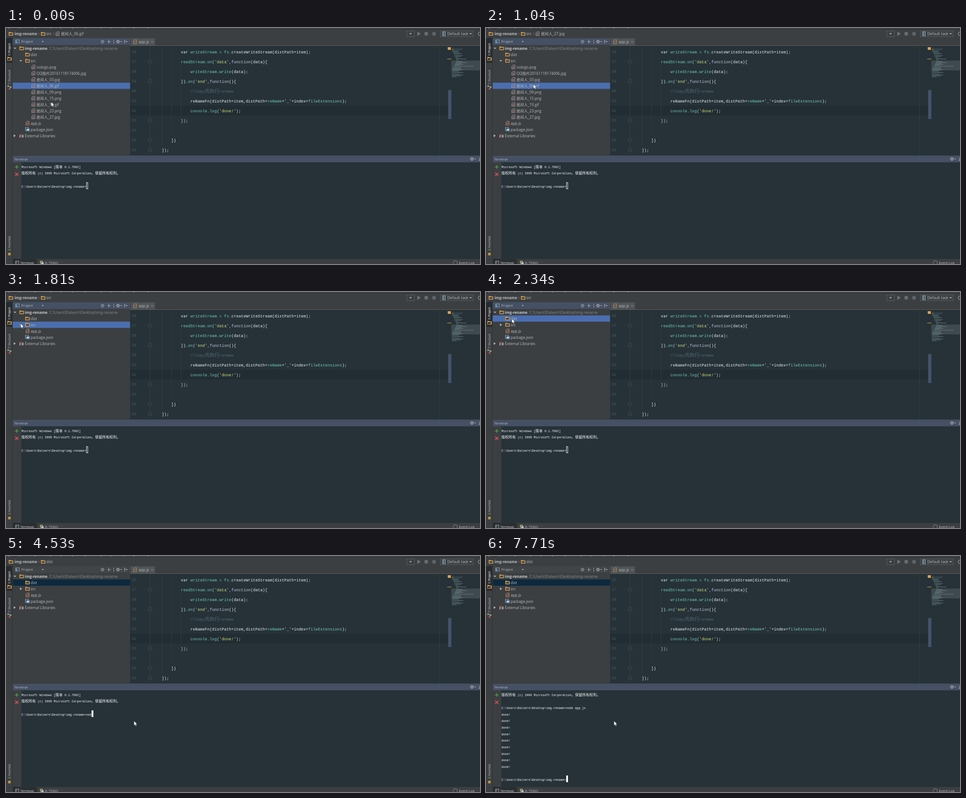
These frames come from a looping animation (1058x529 px, 8000 ms). An HTML page with a canvas:

```html
<!DOCTYPE html>
<html lang="zh">
<head>
<meta charset="utf-8">
<title>img-rename</title>
<style>
html, body { margin: 0; width: 100%; height: 100%; overflow: hidden; background: #3c3f41; }
canvas { display: block; }
</style>
</head>
<body>
<canvas id="stage" width="1058" height="529"></canvas>
<script>
const c = document.getElementById('stage').getContext('2d');
const LOOP = 8000;
const UI = '"Open Sans", "Noto Sans CJK SC", "Noto Sans CJK", sans-serif';
const MONO = '"Liberation Mono", monospace';
const CJK = '"Noto Sans CJK SC", "Noto Sans CJK", sans-serif';
const PANEL = '#3c3f41', DARK = '#263238', BLUE = '#455064', TAN = '#cfa05c', GREY = '#a9adb0', TEXT = '#bcbec0';
const PROMPT = 'C:\\Users\\Dalvern\\Desktop\\img-rename>';

// Timelines: [start in ms, value...]
const pointer = [[0, 101, 166], [270, 100, 172], [520, 98, 202], [770, 109, 139], [1040, 106, 126],
  [1290, 88, 112], [1560, 33, 71], [2090, 36, 69], [2340, 58, 60], [2860, 140, 298],
  [3140, 195, 370], [3420, 196, 354], [3690, 286, 370]];
const selection = [[0, '居间人_06.gif'], [270, '居间人_19.gif'], [520, '居间人_27.jpg'], [1040, '居间人_06.gif'],
  [1290, '居间人_03.jpg'], [1810, 'src'], [2340, 'dist']];
const crumbs = [[0, '居间人_06.gif'], [520, '居间人_19.gif'], [1040, '居间人_27.jpg'], [1290, '居间人_06.gif'],
  [1560, '居间人_03.jpg'], [1810, 'src'], [2590, 'dist']];
const typing = [[0, ''], [4530, 'nod'], [4810, 'node '], [5060, 'node ap'], [5330, 'node app'], [5830, 'node app.'],
  [6110, 'node app.s'], [6380, 'node app.sj'], [6630, 'node app.s'], [6880, 'node app.'], [7160, 'node app.js']];
const COLLAPSE = 1810, FOCUS = 3690, BLINK = 3970, RUN = 7710;
const files = ['nologo.png', 'QQ图片20161118174006.jpg', '居间人_03.jpg', '居间人_06.gif', '居间人_09.png',
  '居间人_15.png', '居间人_19.gif', '居间人_23.png', '居间人_27.jpg'];

// Each code line: indent level, then runs led by a colour key
const hues = { w: '#e8eeee', t: '#6fcbb8', p: '#b9d3d0', k: '#c6c3dc', s: '#d3dc78', c: '#526a74' };
const code = [
  [2, 'wvar |twriteStream = fs.|wcreateWriteStream(distPath+item)|p;'],
  [2, "treadStream.on|p('|sdata|p',|kfunction|w(data){"],
  [3, 'twriteStream.write|w(data)|p;'],
  [2, "w}).|ton|p('|send|p',|kfunction|w(){"],
  [3, 'c//copy完执行rename'],
  [3, "wreNameFn(distPath+item,distPath+|treName|w+|s'_'|w+index+|tfileExtensions|w);"],
  [3, "tconsole.log|p('|sdone!|p')|w;"],
  [2, 'p});'], [0, ''], [1, 'w})'], [0, 'w});']
];

const at = (list, t) => list.findLast(e => e[0] <= t);

function box(x, y, w, h, color) {
  c.fillStyle = color;
  c.fillRect(x, y, w, h);
}
function frame(x, y, w, h, color) {
  c.strokeStyle = color;
  c.lineWidth = 1;
  c.strokeRect(x + .5, y + .5, w - 1, h - 1);
}
function poly(points, color) {
  c.fillStyle = color;
  c.beginPath();
  for (let i = 0; i < points.length; i += 2) c.lineTo(points[i], points[i + 1]);
  c.fill();
}
function line(points, color, width = 1) {
  c.strokeStyle = color;
  c.lineWidth = width;
  c.beginPath();
  for (let i = 0; i < points.length; i += 2) c.lineTo(points[i], points[i + 1]);
  c.stroke();
}
function ring(x, y, r, color, width = 1) {
  c.strokeStyle = color;
  c.lineWidth = width;
  c.beginPath();
  c.arc(x, y, r, 0, 7);
  c.stroke();
}
function label(text, x, y, size = 8.4, color = TEXT, weight = 400) {
  c.font = `${weight} ${size}px ${UI}`;
  c.fillStyle = color;
  c.fillText(text, x, y + size * .36);
}
// Monospaced text; CJK glyphs take two cells
function mono(text, x, y, cell, color) {
  c.fillStyle = color;
  for (const run of text.match(/[\u3000-\u9fff]+|[^\u3000-\u9fff]+/g) || []) {
    const wide = run[0] >= '\u3000';
    c.font = wide ? `${cell * 2}px ${CJK}` : `${cell / .6}px ${MONO}`;
    c.fillText(run, x, y + cell * .56);
    x += run.length * cell * (wide ? 2 : 1);
  }
  return x;
}

const down = (x, y, color = GREY, r = 3) => poly([x - r, y - r / 2, x + r, y - r / 2, x, y + r / 2 + .5], color);
const right = (x, y, color = GREY) => poly([x - 2, y - 3, x + 3, y, x - 2, y + 3], color);
const chevron = x => line([x - 1, 10, x + 1.5, 13, x - 1, 16], '#6d7173');

function folder(x, y) {
  poly([x, y - 4, x + 4, y - 4, x + 5, y - 3, x + 10, y - 3, x + 10, y + 4, x, y + 4], TAN);
  box(x + 1.5, y - 1.5, 7, 4, '#4a4238');
}
function fileIcon(x, y) {
  line([x + .5, y + 4, x + .5, y - 2, x + 3, y - 4.5, x + 7.5, y - 4.5, x + 7.5, y + 4, x, y + 4], '#9aa0a4');
  box(x + 2, y - 1.5, 4, 1, '#9aa0a4');
  box(x + 2, y + .5, 4, 2, '#b5654f');
}
function scriptIcon(x, y) {
  line([x + .5, y + 4, x + .5, y - 2, x + 3, y - 4.5, x + 7.5, y - 4.5, x + 7.5, y + 4, x, y + 4], '#b3927e');
  box(x + 2, y - 2, 5, 5, '#4b3b35');
  line([x + 3, y - 2, x + 3, y + 2], '#e08c5a');
  line([x + 5.5, y - 2, x + 5.5, y + 2], '#e08c5a');
}
function jsonIcon(x, y) {
  frame(x, y - 5, 8, 8, '#9aa7b0');
  box(x + 2, y - 2, 8, 6, '#5f90b5');
  box(x + 4, y - 1, 4, 3, '#d5dde2');
}
function libraryIcon(x, y) {
  box(x, y - 2, 2, 6, '#9aa7b0');
  box(x + 3, y - 4, 2, 8, '#c75450');
  box(x + 6, y - 2, 3, 6, '#9aa7b0');
}
function gear(x, y) {
  ring(x, y, 2.4, GREY, 1.5);
  for (let i = 0; i < 8; i++) {
    const a = i * Math.PI / 4;
    line([x + 3 * Math.cos(a), y + 3 * Math.sin(a), x + 4.2 * Math.cos(a), y + 4.2 * Math.sin(a)], GREY);
  }
  down(x + 7, y, GREY, 2);
}

function topBar(crumb) {
  box(0, 0, 1058, 22, PANEL);
  for (const x of [5, 29, 64, 98, 121, 147, 176, 210, 232, 263, 284, 316]) box(x, 0, 3, 1, '#8e9294');
  box(0, 3, 1058, 1, '#323537');
  folder(6, 13);
  label('img-rename', 19, 13, 8.4, TEXT, 700);
  chevron(73);
  folder(78, 13);
  label(crumb === 'dist' ? 'dist' : 'src', 90, 13);
  if (crumb.includes('.')) {
    chevron(106);
    fileIcon(111, 13);
    label(crumb, 123, 13);
  }
  frame(894, 6, 18, 14, '#5b5f61');
  down(903, 13);
  poly([918, 8, 926, 13, 918, 18], '#6b6f71');
  poly([935, 10, 938, 8, 941, 10, 942, 14, 938, 18, 934, 14], '#6b6f71');
  line([933, 10, 943, 16], '#6b6f71');
  line([943, 10, 933, 16], '#6b6f71');
  ring(955, 13, 3.5, '#6b6f71', 1.5);
  poly([954, 10, 960, 13, 954, 16], '#6b6f71');
  frame(969, 6, 74, 14, '#5b5f61');
  frame(974, 8, 7, 10, '#aebcc5');
  box(976, 10, 2, 6, '#6ba4c8');
  label('Default task', 985, 13);
  down(1037, 13);
  ring(1058, 13, 4, GREY);
}

function sideLabel(text, y, color = TEXT, weight = 400) {
  c.save();
  c.translate(8, y);
  c.rotate(-Math.PI / 2);
  label(text, 0, 0, 6.2, color, weight);
  c.restore();
}
function sideBar() {
  box(0, 22, 14, 507, PANEL);
  box(0, 22, 14, 56, '#292c2e');
  sideLabel('1: Project', 62, '#e4e4e4', 600);
  sideLabel('7: Structure', 127);
  sideLabel('2: Favorites', 499);
  folder(3, 69);
  box(4, 68, 4, 4, '#2b2b2b');
  box(3, 129, 4, 3, '#6ba4c8');
  box(8, 131, 4, 3, '#cfa05c');
  box(6, 135, 4, 3, '#c75450');
  const star = [];
  for (let i = 0; i < 10; i++) {
    const a = i * Math.PI / 5 - Math.PI / 2, r = i % 2 ? 2 : 4.8;
    star.push(7.5 + r * Math.cos(a), 506.5 + r * Math.sin(a));
  }
  poly(star, '#e2a143');
  box(14, 22, 1, 496, '#2f3234');
}

function project(t) {
  const focused = t < FOCUS, open = t < COLLAPSE, picked = at(selection, t)[1];
  box(15, 22, 262, 264, PANEL);
  box(15, 23, 262, 15, focused ? BLUE : '#414547');
  frame(21, 26, 9, 8, '#8fa3b0');
  box(22, 28, 3, 5, '#5f90b5');
  label('Project', 34, 30.5, 8);
  down(82, 30.5, GREY, 2.5);
  ring(215.5, 30.5, 3.2, GREY);
  line([213.5, 28.5, 217.5, 32.5], GREY);
  line([217.5, 28.5, 213.5, 32.5], GREY);
  line([226, 30.5, 234, 30.5], GREY);
  line([229.5, 26, 229.5, 35], GREY);
  box(240, 26, 1, 9, '#9a9d9f');
  gear(250, 30.5);
  line([264.5, 26, 264.5, 35], GREY);
  line([272, 30.5, 266, 30.5, 268.5, 28], GREY);

  const names = ['img-rename', 'dist', 'src', ...(open ? files : []), 'app.js', 'package.json', 'External Libraries'];
  names.forEach((name, i) => {
    const y = 45.5 + 14 * i;
    if (name === picked) box(15, y - 7, 262, 14, focused ? '#4b6eaf' : '#0d293e');
    if (!i) {
      down(20, y);
      folder(30, y);
      label(name, 42, y, 8.4, '#c8cacc', 700);
      label(PROMPT.slice(0, -1), 97, y, 8.4, '#888b8d');
    } else if (i < 3) {
      if (i === 2) (open ? down : right)(33, y);
      folder(43, y);
      label(name, 55, y);
    } else if (files.includes(name)) {
      fileIcon(57, y);
      label(name, 68, y);
    } else if (name === 'External Libraries') {
      right(19, y);
      libraryIcon(30, y);
      label(name, 42, y);
    } else {
      (name === 'app.js' ? scriptIcon : jsonIcon)(name === 'app.js' ? 44 : 43, y);
      label(name, 55, y);
    }
  });
}

function minimap() {
  box(994, 73, 64, 22, '#3f4a50');
  c.globalAlpha = .5;
  for (let i = 0; i < 33; i++) {
    const noise = Math.abs(Math.sin(i * 12.9898) * 43758.5453) % 1;
    const indent = i < 3 || i > 24 ? 0 : Math.min(i - 2, 25 - i, 10);
    const tone = i % 7 === 0 ? '#5b6f78' : i % 3 ? '#7fa9a3' : '#a9bcba';
    box(995 + indent, 45 + i * 2, i === 20 ? 44 : 4 + noise * 22, 1, tone);
  }
  c.globalAlpha = 1;
  box(986, 43, 7, 6, '#e0a050');
  box(985, 69, 9, 1, '#d9a443');
  box(987, 139, 7, 65, '#44526b');
}

function editor() {
  box(277, 22, 781, 19, PANEL);
  box(278, 23, 55, 16, '#4e5356');
  scriptIcon(284, 31);
  label('app.js', 296, 31);
  line([324, 29, 328, 33], '#8a8d8f');
  line([328, 29, 324, 33], '#8a8d8f');
  box(277, 39, 781, 1, '#5c5d58');
  box(277, 40, 781, 246, DARK);
  box(277, 174, 710, 22, '#222d33');
  box(321, 41, 1, 244, '#314047');
  box(348, 41, 1, 222, '#2e3c43');
  box(369, 41, 1, 200, '#2e3c43');
  box(390, 86, 1, 22, '#2e3c43');
  box(390, 130, 1, 66, '#2e3c43');
  box(967, 41, 1, 245, '#2f3d44');
  code.forEach(([indent, text], i) => {
    const y = 53.5 + 22 * i;
    mono(String(16 + i), 280.5, y, 4.9, '#4a5d66');
    if ([1, 3, 7, 9, 10].includes(i)) {
      box(317, y - 4, 9, 8, DARK);
      frame(317, y - 4.5, 9, 8, '#37474e');
      box(319, y - .5, 5, 1, '#37474e');
    }
    let x = 347.7 + 21.3 * indent;
    for (const run of text.split('|')) x = mono(run.slice(1), x, y, 5.37, hues[run[0]]);
  });
  minimap();
}

function terminal(t) {
  box(15, 285, 1043, 2, '#303437');
  box(15, 286, 1043, 15, BLUE);
  label('Terminal', 18, 294, 7.5);
  gear(1040, 293.5);
  line([1055, 297, 1058, 297], GREY);
  line([1057, 290, 1057, 296], GREY);
  box(15, 301, 19, 217, PANEL);
  box(34, 301, 1024, 217, DARK);
  line([20, 311.5, 28, 311.5], '#4ba04f', 1.6);
  line([24, 307.5, 24, 315.5], '#4ba04f', 1.6);
  line([20.5, 324.5, 27.5, 331.5], '#d25252', 1.8);
  line([27.5, 324.5, 20.5, 331.5], '#d25252', 1.8);

  const done = t >= RUN, typed = at(typing, t)[1];
  const rows = ['Microsoft Windows [版本 6.1.7601]', '版权所有 (c) 2009 Microsoft Corporation。保留所有权利。', '', PROMPT + typed];
  if (done) {
    rows.shift();
    rows.push(...Array(9).fill('done!'), '', PROMPT);
  }
  rows.forEach((row, i) => mono(row, 34.4, 311.3 + 14.67 * i, 4.01, '#ffffff'));

  const x = Math.round(178.8 + (done ? 0 : 4.01 * typed.length)), y = done ? 492 : 346;
  if (t < FOCUS) frame(x, y, 4, 15, '#f4f6f6');
  else if (t < BLINK || typed) box(x, y, 4, 15, '#ffffff');
}

function statusBar() {
  box(0, 517, 1058, 12, PANEL);
  box(14, 517, 1044, 1, '#2f3234');
  box(15, 518, 54, 11, '#2b2e30');
  box(21, 522, 8, 7, '#b5bcc0');
  box(22, 523, 6, 6, '#26292b');
  line([23, 524, 25, 526, 23, 528], '#c9ced1');
  label('Terminal', 32, 526, 7.4, '#d5d7d8');
  ring(79, 525, 2.5, '#d0bd7c', 1.5);
  box(79, 525, 5, 4, '#b9c0c4');
  label('6: TODO', 87, 526, 7.6);
  ring(1003, 526, 4.5, '#8e9294');
  label('Event Log', 1011, 526, 7.7);
}

function arrow(x, y) {
  const shape = [0, 0, 0, 10.5, 2.4, 8.3, 4.1, 12, 5.9, 11.2, 4.3, 7.6, 7.6, 7.6, 0, 0];
  const moved = shape.map((v, i) => v + (i % 2 ? y : x) - .4);
  poly(moved, '#ffffff');
  line(moved, '#15191b', .7);
}

function draw(now) {
  const t = now % LOOP;
  topBar(at(crumbs, t)[1]);
  sideBar();
  project(t);
  editor();
  terminal(t);
  statusBar();
  const [, x, y] = at(pointer, t);
  arrow(x, y);
}

const start = performance.now();
(function tick() {
  draw(performance.now() - start);
  requestAnimationFrame(tick);
})();
</script>
</body>
</html>
```
